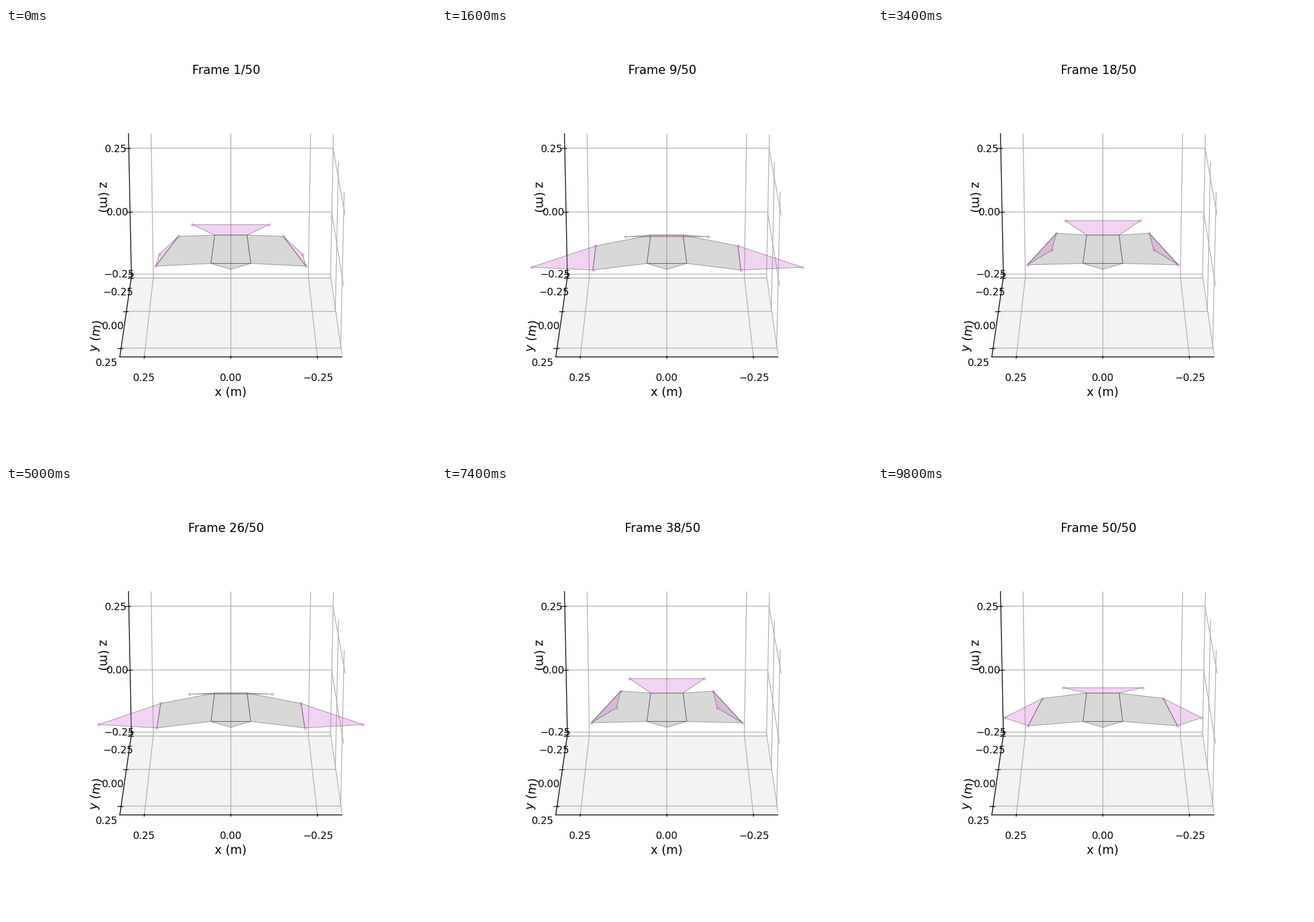
Recreate the animation shown at these times as a matplotlib script. Size 748 by 748 pixels, loop 10 s.

```python
import numpy as np
import matplotlib.pyplot as plt
from matplotlib.animation import FuncAnimation
from matplotlib.colors import to_rgba
from matplotlib.patches import Polygon, Rectangle

SIZE, DPI, COUNT = 748, 125, 50
CX = 391.15            # symmetry axis of the bird, px
LAST = 42              # the wing rests in its mean pose after this frame

# Wing extension (px of wingtip travel from the mean pose) at key frames.
KEYS = np.array([
    (1, -47), (4, -98), (7, -28), (9, 64), (12, 121), (14, 99), (16, 10),
    (18, -83), (20, -110), (23, -70), (25, 13), (26, 58.5), (29, 121),
    (31, 97), (32, 59.5), (34, -42), (36, -100), (38, -84), (40, 0), (42, 91)])
KT, KD = KEYS.T
SLOPE = np.gradient(KD, KT)


def extension(n):
    """Cubic Hermite interpolation of the key poses."""
    if n > LAST:
        return 0.0
    i = min(np.searchsorted(KT, n, side="right") - 1, len(KT) - 2)
    h = KT[i + 1] - KT[i]
    t = (n - KT[i]) / h
    return ((1 + 2 * t) * (1 - t) ** 2 * KD[i] + t * (1 - t) ** 2 * h * SLOPE[i]
            + t * t * (3 - 2 * t) * KD[i + 1] + t * t * (t - 1) * h * SLOPE[i + 1])


def half_bird(d):
    """Left-side keypoints as (distance from the axis, y)."""
    return dict(
        shoulder=(28.2, 360.2),
        hip=(34.6, 409.6),
        wrist=(105.1 + 0.2925 * d, 369.5 + 0.15 * d),
        elbow=(129.8 - 0.0185 * d, 417.1 + 0.0615 * d),
        tip=(171.6 + d, 403.1 + 0.203 * d),
        tail=(69.2 + 0.048 * d, 350.9 + 0.19 * d))


def place(point, side):
    return CX + side * point[0], point[1]


def shapes(d):
    p = half_bird(d)
    left, right = ({k: place(v, s) for k, v in p.items()} for s in (-1, 1))
    polys = [[s[k] for k in ("shoulder", "wrist", "elbow", "hip")]
             for s in (left, right)]
    polys.append([left["shoulder"], right["shoulder"], right["hip"], left["hip"]])
    polys.append([left["hip"], right["hip"], (CX, 419.8)])
    polys.append([left["shoulder"], right["shoulder"], right["tail"], left["tail"]])
    polys += [[s[k] for k in ("wrist", "tip", "elbow")] for s in (left, right)]
    dots = [s[k] for s in (left, right) for k in ("wrist", "elbow", "tip", "tail")]
    return polys, dots


plt.rcParams["font.family"] = "DejaVu Sans"
fig = plt.figure(figsize=(SIZE / DPI, SIZE / DPI), dpi=DPI, facecolor="white")

ax = fig.add_subplot(projection="3d")
ax.view_init(elev=20, azim=89.999)
ax.set_xlim(-0.3208, 0.3208, view_margin=0)
ax.set_ylim(-0.2605, 0.3065, view_margin=0)
ax.set_zlim(-0.2605, 0.3065, view_margin=0)
for axis, name in ((ax.xaxis, "x"), (ax.yaxis, "y"), (ax.zaxis, "z")):
    axis.set_ticks([-0.25, 0, 0.25])
    axis.set_label_text(f"{name} (m)", fontsize=12)
    axis.set_pane_color((0.953,) * 3 + (1,) if name == "z" else (1, 1, 1, 1))
title = ax.set_title("", fontsize=12)

# Pixel-space layer for the bird, clipped to the square plot area.
layer = fig.add_axes([0, 0, 1, 1])
layer.set(xlim=(0, SIZE), ylim=(SIZE, 0))
layer.axis("off")
clip = Rectangle((95.37, 89.76), 575.96, 575.96, transform=layer.transData)

GREY, PINK = to_rgba("gray", 0.3), to_rgba("orchid", 0.3)
EDGE = to_rgba("black", 0.4)
patches = []
for fill in [GREY] * 4 + [PINK] * 3:
    patch = Polygon([(0, 0), (0, 1), (1, 0)], closed=True, fc=fill, ec=EDGE, lw=0.55)
    layer.add_patch(patch)
    patch.set_clip_path(clip)
    patches.append(patch)
dots = layer.scatter(np.zeros(8), np.zeros(8), s=8, color=to_rgba("orchid", 0.4),
                     linewidths=0.5, zorder=3)
dots.set_clip_path(clip)


def draw(i):
    polys, points = shapes(extension(i + 1))
    for patch, poly in zip(patches, polys):
        patch.set_xy(poly)
    dots.set_offsets(points)
    title.set_text(f"Frame {i + 1}/{COUNT}")
    return [*patches, dots, title]


anim = FuncAnimation(fig, draw, frames=COUNT, interval=200,
                     repeat=True, repeat_delay=0, blit=False)
plt.show()
```
